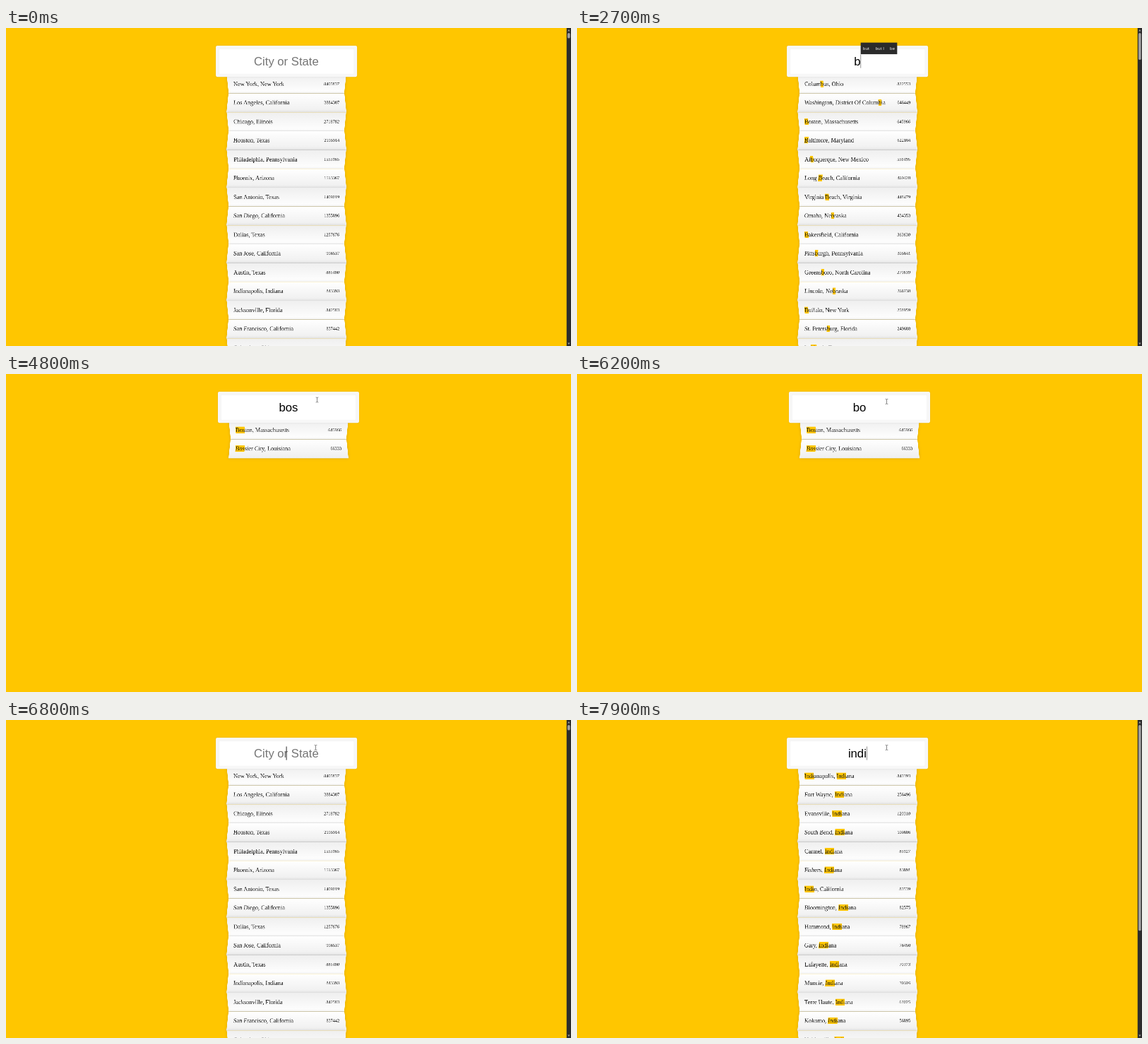
Animation of 800 by 450 pixels, one loop 8 s. Source, as an HTML page:

```html
<!DOCTYPE html>
<html lang="en">
<head>
<meta charset="utf-8">
<title>City search</title>
<style>
  html, body { margin: 0; width: 100%; height: 100%; overflow: hidden; background: #ffc600; }
  * { box-sizing: border-box; }
  #page {
    position: absolute; left: 0; top: 0; width: 1920px; height: 1080px; overflow: hidden;
    transform: scale(.4166667); transform-origin: 0 0;
    font: 20px "Liberation Serif", serif; color: #1a1a1a;
  }
  #form { position: absolute; left: 760px; top: 50px; width: 400px; }
  .scrolls #form { left: 752.5px; }
  #search {
    position: relative; top: 10px; left: -10%; width: 120%; height: 106px; z-index: 2;
    display: flex; justify-content: center; padding: 20px;
    background: #fff; border: 10px solid #f7f7f7; border-radius: 5px;
    box-shadow: 0 0 5px rgba(0,0,0,.12), inset 0 0 2px rgba(0,0,0,.19);
    font: 40px/46px "Liberation Sans", sans-serif; color: #000;
  }
  #field { position: relative; white-space: pre; }
  #field.empty { color: #757575; }
  #caret { position: absolute; left: 100%; top: 0; width: 1.5px; height: 46px; background: #000; }
  .empty ~ *, .empty #caret { left: 50%; }
  #popup {
    position: absolute; left: 100%; top: -41px; height: 40px; padding: 0 8px;
    display: flex; gap: 20px; background: #2b2b2b; color: #fff;
    font: 14px/41px "Open Sans", sans-serif;
  }
  #list { margin: 0; padding: 0; position: relative; }
  #list li {
    display: flex; justify-content: space-between; list-style: none;
    height: 64px; padding: 20px; line-height: 23px; white-space: nowrap;
    border-bottom: 1px solid #d8d8d8; box-shadow: 0 0 10px rgba(0,0,0,.14);
  }
  #list li:nth-child(even) {
    transform: perspective(100px) rotateX(3deg) translateY(2px) scale(1.001);
    background: linear-gradient(to bottom, #fff, #efefef);
  }
  #list li:nth-child(odd) {
    transform: perspective(100px) rotateX(-3deg) translateY(3px);
    background: linear-gradient(to top, #fff, #efefef);
  }
  .count { font-size: 15px; }
  .hl { background: #ffc600; }
  #bar { position: absolute; right: 0; top: 0; width: 15px; height: 1080px; background: #2c2c2c; display: none; }
  .scrolls #bar { display: block; }
  #thumb { position: absolute; left: 3px; top: 17px; width: 9px; border-radius: 5px; background: #9f9f9f; }
  #bar svg { position: absolute; left: 0; top: 0; }
  #mouse { position: absolute; left: 0; top: 0; overflow: visible; }
</style>
</head>
<body>
<div id="page">
  <div id="form">
    <div id="search"><div id="field"><span id="text"></span><i id="caret"></i><div id="popup"><span>but</span><span>but I</span><span>be</span></div></div></div>
    <ul id="list"></ul>
  </div>
  <div id="bar">
    <svg width="15" height="1080" fill="#9f9f9f"><path d="M3.500 11L7.500 5L11.500 11ZM3.500 1069L7.500 1075L11.500 1069Z"/></svg>
    <div id="thumb"></div>
  </div>
</div>
<svg id="mouse" width="1" height="1">
  <path id="beam" d="M-1.800-3.500Q-.2-3.500 0-3Q.2-3.500 1.800-3.500M0-3V3M-1.800 3.500Q-.2 3.500 0 3Q.2 3.500 1.800 3.500" fill="none" stroke="#555" stroke-width=".7"/>
  <path id="arrow" d="M0 0V8.500L2 6.700L3.300 9.600L4.600 9L3.300 6.200H6Z" fill="#fff" stroke="#000" stroke-width=".5"/>
</svg>
<script>
const $ = id => document.getElementById(id);
const LOOP = 8000, STEP = 100, ROWS = 15;

const cities = `New York, New York 8405837
Los Angeles, California 3884307
Chicago, Illinois 2718782
Houston, Texas 2195914
Philadelphia, Pennsylvania 1553165
Phoenix, Arizona 1513367
San Antonio, Texas 1409019
San Diego, California 1355896
Dallas, Texas 1257676
San Jose, California 998537
Austin, Texas 885400
Indianapolis, Indiana 843393
Jacksonville, Florida 842583
San Francisco, California 837442
Columbus, Ohio 822553
Charlotte, North Carolina 792862
Detroit, Michigan 688701
Memphis, Tennessee 653450
Seattle, Washington 652405
Washington, District Of Columbia 646449
Boston, Massachusetts 645966
Baltimore, Maryland 622104
Albuquerque, New Mexico 556495
Long Beach, California 469428
Virginia Beach, Virginia 448479
Colorado Springs, Colorado 439886
Omaha, Nebraska 434353
Raleigh, North Carolina 431746
Minneapolis, Minnesota 400070
Arlington, Texas 379577
Bakersfield, California 363630
Pittsburgh, Pennsylvania 305841
Cincinnati, Ohio 297517
Greensboro, North Carolina 279639
Lincoln, Nebraska 268738
Buffalo, New York 258959
Fort Wayne, Indiana 256496
St. Petersburg, Florida 249688
Durham, North Carolina 245475
Lubbock, Texas 239538
Boise City, Idaho 214237
Evansville, Indiana 120310
Murfreesboro, Tennessee 117044
Ann Arbor, Michigan 117025
Boulder, Colorado 103166
South Bend, Indiana 100886
Hillsboro, Oregon 97368
Boca Raton, Florida 89407
Carmel, Indiana 85927
Fishers, Indiana 83891
Indio, California 83539
Bloomington, Indiana 82575
Hammond, Indiana 78967
Gary, Indiana 78450
Bolingbrook, Illinois 73936
Jonesboro, Arkansas 71551
Boynton Beach, Florida 71097
Lafayette, Indiana 70373
Muncie, Indiana 70316
Bossier City, Louisiana 66333
Bowling Green, Kentucky 61488
Terre Haute, Indiana 61025
Owensboro, Kentucky 58416
Kokomo, Indiana 56895
Noblesville, Indiana 56540`.split("\n").map(line => line.match(/(.+) (\d+)/).slice(1));

// Typed text, and the list that follows it a moment later
const typed = [[0, ""], [2500, "b"], [2900, "bo"], [3000, "bos"], [6200, "bo"], [6400, "b"], [6600, ""],
  [7400, "i"], [7600, "in"], [7700, "ind"], [7800, "indi"]];
const listed = [[0, ""], [2600, "b"], [3000, "bo"], [3100, "bos"], [6300, "bo"], [6500, "b"], [6800, ""],
  [7500, "i"], [7700, "in"], [7800, "ind"], [7900, "indi"]];
const thumbHeight = { "": 18, i: 18, in: 57, ind: 640, indi: 699, b: 91, bo: 600 };

const caretOn = [[1100, 1600], [2100, 3500], [4000, 4500], [5500, 6000], [6300, 7100], [7400, LOOP]];
const popupOn = [[2700, 3900]];
const mousePaths = [
  [[700, 623, 297], [1000, 490, 140], [1200, 408, 25], [1400, 396, 42], [2500, 396, 42]],
  [[3900, 396, 42], [4300, 523, 140], [4500, 505, 112], [4700, 454, 47.5], [4800, 440.5, 36.5],
   [5000, 440.5, 36.5], [5200, 438.5, 39], [LOOP, 438.5, 39]]
];

const latest = (track, t) => track.filter(([start]) => start <= t).pop()[1];
const within = (spans, t) => spans.some(([from, to]) => t >= from && t < to);
const show = (id, on) => { $(id).style.display = on ? "" : "none"; };

function mouseAt(t) {
  const path = mousePaths.find(p => t >= p[0][0] && t < p[p.length - 1][0]);
  if (!path) return null;
  const i = path.findIndex(([time]) => time > t);
  const [t0, x0, y0] = path[i - 1], [t1, x1, y1] = path[i];
  const k = (t - t0) / (t1 - t0);
  return [x0 + (x1 - x0) * k, y0 + (y1 - y0) * k];
}

let shownQuery = null;
function showList(query) {
  if (query === shownQuery) return;
  shownQuery = query;
  const mark = name => query ? name.replace(new RegExp(query, "gi"), m => `<span class="hl">${m}</span>`) : name;
  $("list").innerHTML = cities
    .filter(([name]) => name.toLowerCase().includes(query))
    .slice(0, ROWS)
    .map(([name, count]) => `<li><span>${mark(name)}</span><span class="count">${count}</span></li>`)
    .join("");
  $("page").className = query in thumbHeight ? "scrolls" : "";
  $("thumb").style.height = (thumbHeight[query] || 0) + "px";
}

function draw(t) {
  const text = latest(typed, t);
  $("text").textContent = text || "City or State";
  $("field").className = text ? "" : "empty";
  showList(latest(listed, t));
  show("caret", within(caretOn, t));
  show("popup", within(popupOn, t));
  const mouse = mouseAt(t);
  show("mouse", mouse);
  if (mouse) {
    const [x, y] = mouse;
    const overInput = y < 69 && x < 497;
    show("beam", overInput);
    show("arrow", !overInput);
    $("mouse").style.transform = `translate(${x}px, ${y}px)`;
  }
}

let lastTick = -1;
function frame() {
  const tick = Math.floor(performance.now() % LOOP / STEP) * STEP;
  if (tick !== lastTick) draw(lastTick = tick);
  requestAnimationFrame(frame);
}
frame();
</script>
</body>
</html>
```
